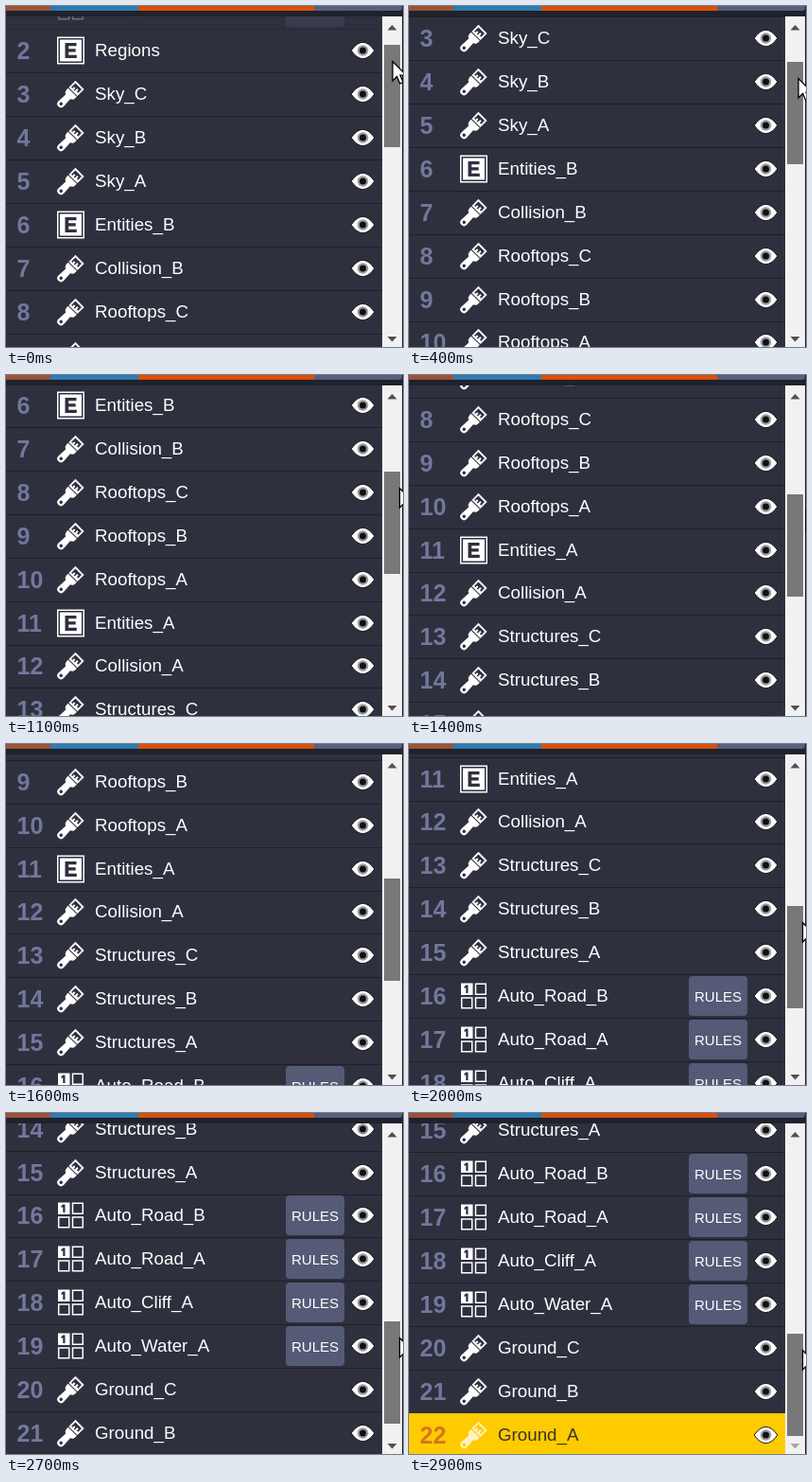
These frames come from a looping animation (420x360 px, 3000 ms). An HTML page:

```html
<!DOCTYPE html>
<html lang="en">
<head>
<meta charset="utf-8">
<title>Layer list</title>
<style>
html, body { margin: 0; width: 100%; height: 100%; overflow: hidden; background: #20222c; }
svg { display: block; font-family: "Liberation Sans", Arial, sans-serif; }
.num { font-size: 25px; font-weight: bold; fill: #71789b; }
.label { font-size: 18.75px; fill: #fff; }
.rules { font-size: 15px; fill: #fff; }
.last .num { fill: #d8741c; }
.last .label { fill: #3a3326; }
.last .brush { opacity: .75; }
</style>
</head>
<body>
<svg width="420" height="360" viewBox="0 0 420 360">
  <defs>
    <clipPath id="view"><rect y="11" width="398" height="349"/></clipPath>
    <g id="brush" transform="rotate(45)" fill="#fff">
      <path fill-rule="evenodd" d="M-6.5 -2.5H6.5V0Q6.5 2.6 3.4 4.2L4 14.5Q4 18.5 0 18.5T-4 14.5L-3.4 4.2Q-6.5 2.6 -6.5 0ZM0 12.8a1.7 1.7 0 1 0 .01 0Z"/>
      <path fill-rule="evenodd" d="M-6.5 -3.5V-13.5H6.5V-3.5ZM-4.6 -11.6V-5.5H-3V-8H-1V-5.5H.6V-9H2.6V-6.5H4.6V-11.6Z"/>
    </g>
    <g id="entity">
      <rect x="-13.75" y="-13.75" width="27.5" height="27.5" fill="none" stroke="#fff" stroke-width="1.5"/>
      <rect x="-11.5" y="-11.5" width="23" height="23" fill="#fff"/>
      <path fill="#2e303e" d="M-6 -8H6V-4.7H-2.3V-1.8H5.2V1.5H-2.3V4.7H6.3V8H-6Z"/>
    </g>
    <g id="auto">
      <rect x="-13.5" y="-13.5" width="12.5" height="12.5" fill="#fff"/>
      <path fill="#2e303e" d="M-8.2 -11.5H-6V-3H-8.2V-8.8L-10 -8V-10Z"/>
      <path fill="none" stroke="#fff" stroke-width="1.5" d="M2 -12.8H12.8V-1.8H2ZM-12.8 2H-1.8V12.8H-12.8ZM2 2H12.8V12.8H2Z"/>
    </g>
    <g id="eye">
      <path fill="#fff" stroke="#16171d" d="M-12.3 0Q-6.5 -8.6 0 -8.6T12.3 0Q6.5 8.6 0 8.6T-12.3 0Z"/>
      <circle r="5.8" fill="#9a9a9c"/>
      <circle r="3.5" fill="#101116"/>
    </g>
  </defs>
  <rect width="420" height="360" fill="#20222c"/>
  <g clip-path="url(#view)">
    <rect y="11" width="398" height="349" fill="#2e303e"/>
    <g id="list"></g>
  </g>
  <path fill="#9d5234" d="M0 0H47V5H0Z"/>
  <path fill="#2a7db2" d="M47 0H140V5H47Z"/>
  <path fill="#da5009" d="M140 0H326V5H140Z"/>
  <path fill="#5a5f7e" d="M326 0H419V2Q419 5 416 5H326Z"/>
  <rect x="398" y="11" width="21" height="349" fill="#f1f1f1"/>
  <path fill="#505050" d="M403.5 25.5L408.5 20L413.5 25.5Z"/>
  <path id="down" d="M403.5 349L408.5 354.5L413.5 349Z"/>
  <rect id="thumb" x="400" width="17" height="108" fill="#787878"/>
  <path id="cursor" fill="#fff" stroke="#000" stroke-width="1.3" d="M0 0V20.5L4.6 16L7.8 23.4L11.2 22L8 14.6H14.5Z"/>
</svg>
<script>
const LOOP = 3000, STEP = 100, PITCH = 45.9, FIRST = 1.3, RATIO = 3.25;
const $ = id => document.getElementById(id);
const names = ("Auto_Top Regions Sky_C Sky_B Sky_A Entities_B Collision_B Rooftops_C Rooftops_B Rooftops_A " +
  "Entities_A Collision_A Structures_C Structures_B Structures_A Auto_Road_B Auto_Road_A " +
  "Auto_Cliff_A Auto_Water_A Ground_C Ground_B Ground_A").split(" ");

const iconOf = name => /^(Reg|Ent)/.test(name) ? "entity" : /^Auto/.test(name) ? "auto" : "brush";

function row(name, i) {
  const icon = iconOf(name), last = i === names.length - 1;
  const rules = icon === "auto"
    ? '<rect x="296" y="-21" width="62" height="42" rx="4" fill="#555a76"/><text class="rules" x="302" y="6">RULES</text>' : "";
  const back = last
    ? '<rect y="-23" width="398" height="46" fill="#fecb00"/>'
    : '<rect y="23" width="398" height="1" fill="#1d1f28"/>';
  return `<g class="${last ? "last" : ""}" opacity="${i ? 1 : .3}">
    ${back}<text class="num" x="11.5" y="9">${i + 1}</text>
    <use class="${icon}" href="#${icon}" x="68.5"/>
    <text class="label" x="94" y="6">${name}</text>${rules}
    <use href="#eye" x="377.5"/></g>`;
}
$("list").innerHTML = names.map(row).join("");
const rows = [...$("list").children];

// time, scroll offset, pointer x
const keys = [[0, 0, 409], [400, 58.95, 412], [1100, 198.75, 416.5], [1600, 328.75, 421],
  [2000, 423.75, 416.5], [2400, 514.8, 416.5], [2900, 625.5, 416.5]];

function slope(i, c) {
  const a = keys[Math.max(i - 1, 0)], b = keys[Math.min(i + 1, keys.length - 1)];
  return (b[c] - a[c]) / (b[0] - a[0]);
}

// smooth curve through the keys
function at(t, c) {
  let i = 0;
  while (i < keys.length - 2 && t >= keys[i + 1][0]) i++;
  const a = keys[i], b = keys[i + 1], d = b[0] - a[0], u = (t - a[0]) / d, v = 1 - u;
  return v * v * (1 + 2 * u) * a[c] + u * u * (3 - 2 * u) * b[c]
    + d * u * v * (v * slope(i, c) - u * slope(i + 1, c));
}

function draw(now) {
  const t = Math.floor(now % LOOP / STEP) * STEP;
  const scroll = at(t, 1), top = Math.round(41 + scroll / RATIO);
  rows.forEach((r, i) =>
    r.setAttribute("transform", `translate(0 ${Math.round(FIRST + i * PITCH - scroll)})`));
  $("thumb").setAttribute("y", top);
  $("cursor").setAttribute("transform", `translate(${at(t, 2)} ${top + 17.5})`);
  $("down").setAttribute("fill", scroll > 625 ? "#a8a8a8" : "#505050");
}

const start = performance.now();
function tick() {
  draw(performance.now() - start);
  requestAnimationFrame(tick);
}
tick();
</script>
</body>
</html>
```
